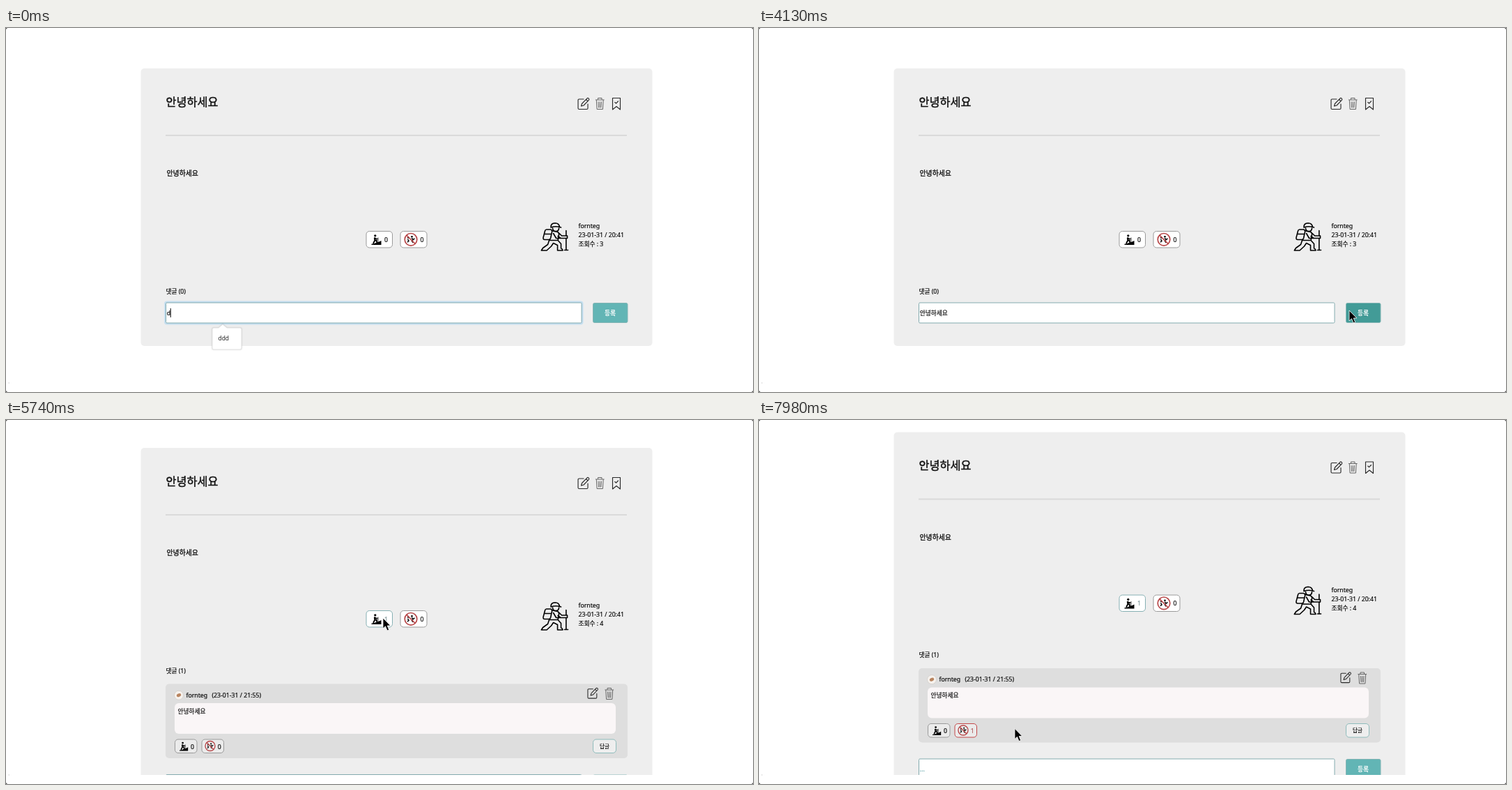
Animation, 1072 px wide and 522 px high, one loop 8000 ms. Source, as an HTML page:

```html
<!DOCTYPE html>
<html lang="ko">
<head>
<meta charset="utf-8">
<title>댓글</title>
<style>
  html, body { margin: 0; width: 100%; height: 100%; overflow: hidden; background: #fff; }
  svg { display: block; width: 1072px; height: 522px; }
  text { font: 500 8.7px "Noto Sans", "Noto Sans CJK KR", sans-serif; fill: #111; stroke: #111; stroke-width: .22; white-space: pre; }
  .title { font-size: 16.3px; stroke-width: .45; }
  .body { font-size: 9.9px; stroke-width: .3; }
  .reply { font-size: 7.6px; }
  .submit { font-weight: 700; fill: #fff; stroke: none; }
  .pop text { font-size: 8.4px; font-weight: 400; fill: #222; stroke: none; }
  .icon { fill: none; stroke: #2a2a2a; stroke-width: 1.15; stroke-linecap: round; stroke-linejoin: round; }
  .btn { fill: #fff; stroke: #9a9a9a; }
  .small { fill: #ebebeb; }
</style>
</head>
<body>
<svg viewBox="0 0 1072 522">
  <defs>
    <clipPath id="view"><rect width="1072" height="509"/></clipPath>
    <g id="edit" class="icon">
      <path d="M9 2.500H2.500Q1 2.500 1 4V15.500Q1 17 2.500 17H13.500Q15 17 15 15.500V9.500"/>
      <path d="M5.500 12.500L6.500 9L14 1.300Q15 .5 16.200 1.600Q17.300 2.800 16.400 3.800L9 11.500ZM12.500 3L14.800 5.200"/>
    </g>
    <g id="trash" class="icon" style="stroke:#666;stroke-width:1">
      <path d="M.8 3.500H12.700M4 3V1H9.500V3M1.800 4L2.600 17H10.900L11.700 4M4.500 6.500L5 14.500M6.750 6.500V14.500M9 6.500L8.500 14.500"/>
    </g>
    <g id="mark" class="icon"><path d="M1 1H12V17.500L6.500 13L1 17.500ZM4.300 7L6 8.700L9 5.500"/></g>
    <g id="climb">
      <path d="M0 15V13.800L5 12.800L8 11L11 10.500L14 9V15Z"/>
      <circle cx="5.300" cy="1.800" r="1.600"/>
      <path d="M4.200 4.500L4.800 8.500L2.500 13M4.800 8.500L7.500 9V11.500M4.500 4.800L6.500 6.600L9 6.300" fill="none" stroke="#000" stroke-width="1.800" stroke-linejoin="round"/>
      <path d="M9.500 4.500V10.500" stroke="#000" stroke-width=".7"/>
    </g>
    <g id="ban">
      <circle cx="1.500" cy="-4" r="1.300"/><circle cx="-4" cy="-2.500" r="1.100"/>
      <path d="M-4.500 -.5L-3 2L-5 4M1 -2L3.500 0L1.500 2L3 4.500M3.500 0L5.500 -1.500" fill="none" stroke="#111" stroke-width="1.600"/>
      <circle r="8.800" fill="none" stroke="#b8484a" stroke-width="1.700"/>
      <path d="M-6.200 -6.200L6.200 6.200" stroke="#b8484a" stroke-width="1.700"/>
    </g>
    <path id="hiker" fill="none" stroke="#000" stroke-width="1.600" stroke-linecap="round" stroke-linejoin="round"
      d="M14.500 7.500Q14 1.500 20.500 1.200Q26 1.300 27 6.500M14.500 7.500Q21 5 29 7.500M17 8.500Q17 13 21.500 13Q26 13 26 8.500
         M8 10.500H14Q16.500 11 16 14L14 23Q13.500 25 11.500 25H5.500Q3 25 3.500 22L6 12.500Q6.500 10.500 8 10.500M4.800 17H15
         M17 12.500L24 14Q26.500 15 26 18L24.500 26H12M26.500 16L30 19.500H38V23H28.500L24.500 20M18 16L22 23H28
         M36.300 12V19M36.300 23V40M34 40H39
         M12 26L10 32L3 37L.8 40.500H8.500L15 34.500L18 30L24 33V40.500H31.500Q31 38 29 37.500V31L24.500 26"/>
  </defs>

  <g clip-path="url(#view)">
    <g id="page">
      <path d="M4 -9H1072" stroke="#555" stroke-width="1.500"/>
      <rect id="card" x="193.500" y="58" width="734" height="398" rx="5" fill="#eee"/>
      <text class="title" x="229.500" y="111.500">안녕하세요</text>
      <use href="#edit" x="820" y="99.500"/>
      <use href="#trash" x="845.500" y="99.500"/>
      <use href="#mark" x="869.500" y="99.500"/>
      <path d="M229 154H891" stroke="#dadada" stroke-width="2"/>
      <text class="body" x="230.500" y="212">안녕하세요</text>

      <rect id="likeBox" class="btn" x="517" y="291.500" width="37.500" height="23.500" rx="4.500"/>
      <use href="#climb" x="524.500" y="296"/>
      <text id="likes" x="543" y="306.700">0</text>
      <rect class="btn" x="566" y="291.500" width="38" height="23.500" rx="4.500"/>
      <use href="#ban" x="581" y="303.300"/>
      <text x="594.500" y="306.700">0</text>

      <use href="#hiker" x="767.500" y="278.500"/>
      <text x="821.500" y="287.300">fornteg</text>
      <text x="821.500" y="300.300">23-01-31 / 20:41</text>
      <text id="views" x="821.500" y="313.300"></text>
      <text id="count" x="229.500" y="380.500"></text>

      <g id="comment">
        <rect x="229" y="396.500" width="663" height="106.500" rx="5" fill="#dedede"/>
        <circle cx="248" cy="412.700" r="6.500" fill="#f6f2ee" stroke="#c9c4c0" stroke-width=".6"/>
        <ellipse cx="248" cy="412.700" rx="3.300" ry="2.300" fill="#b98560" transform="rotate(-25 248 412.700)"/>
        <text x="258.500" y="415.700">fornteg</text>
        <text x="295.500" y="415.700">(23-01-31 / 21:55)</text>
        <use href="#edit" transform="translate(834 401.500) scale(.92)"/>
        <use href="#trash" x="859" y="401.500"/>
        <rect x="242" y="424" width="633" height="44" rx="6" fill="#faf6f7"/>
        <text x="246.500" y="438.800">안녕하세요</text>
        <rect class="btn small" x="242.500" y="476" width="31.500" height="19.500" rx="4.500"/>
        <use href="#climb" transform="translate(249 479.500) scale(.87)"/>
        <text x="265" y="489.700">0</text>
        <rect id="banBox" class="btn small" x="281" y="476" width="31.500" height="19.500" rx="4.500"/>
        <use href="#ban" transform="translate(293 485.500) scale(.8)"/>
        <text id="bans" x="303.700" y="489.700">0</text>
        <rect x="842.500" y="476" width="33" height="19.500" rx="4.500" fill="#eee" stroke="#8fbcbc"/>
        <text class="reply" x="852" y="488.700">답글</text>
      </g>

      <g id="form">
        <rect id="glow" x="229" y="393.500" width="597.500" height="30" rx="2" fill="none" stroke="#c6dff0" stroke-width="4"/>
        <rect x="229.500" y="394" width="596.500" height="29" rx="1.500" fill="#fff" stroke="#82aaae"/>
        <text id="typed" x="230.800" y="411.800"></text>
        <path id="under" stroke="#222" stroke-width=".9"/>
        <path id="caret" stroke="#000" stroke-width="1"/>
        <rect id="submit" x="842.500" y="394.500" width="49.500" height="28" rx="2" stroke="#82b4b4"/>
        <text class="submit" x="859" y="411.800">등록</text>
      </g>
    </g>
    <g id="popup" class="pop"></g>
  </g>

  <path d="M3.500 509H5" stroke="#bbb" stroke-width=".8"/>
  <path d="M0 0H2L0 2ZM1072 0H1070L1072 2ZM0 522H2L0 520ZM1072 522H1070L1072 520Z" fill="#555"/>
  <path id="beam" fill="none" stroke="#111" stroke-width="1.500" d="M-3.500 -8Q0 -8 0 -5.500Q0 -8 3.500 -8M0 -6V6M-3.500 8Q0 8 0 5.500Q0 8 3.500 8M-2 1.500H2"/>
  <path id="arrow" fill="#000" stroke="#fff" stroke-width=".8" d="M0 0V15L3.500 11.800L6 18L8.700 16.900L6.200 11H10.800Z"/>
</svg>
<script>
const LOOP = 8000, STEP = 70, CHAR = 8;
const BLUR = 3990, RELOAD = 4410, LIKED = 5670, BANNED = 7490;
const $ = id => document.getElementById(id);

const popups = {
  d: { w: 42, items: ['ddd'] },
  jamo: { w: 115, items: ['ㅇㅇ', 'ㅇㅇㅇㅇ', 'ㅇㅇㅇㅇㅇㅇㅇㅇㅇㅇㅇㅇ'] },
  hello: { w: 83, items: ['안녕하세요', '안녕하세요ㅎㅎ', '안녕하세요!!!'] }
};

// time, input text, suggestion list
const typing = [
  [0, 'd', 'd'], [770, ''], [980, 'ㅇ'], [1050, 'ㅇ', 'jamo'], [1260, '아'],
  [1400, '안'], [1540, '안ㄴ'], [1680, '안녀'], [2030, '안녕'], [2240, '안녕ㅎ'],
  [2310, '안녕하'], [2380, '안녕하', 'hello'], [2450, '안녕핫'], [2520, '안녕하세'],
  [2590, '안녕하세', 'hello'], [2660, '안녕하셍'], [2800, '안녕하세요', 'hello'],
  [BLUR, '안녕하세요'], [RELOAD, '...']
];

// time, x, y
const pointer = [
  [3290, 532, 398], [3990, 847, 405], [4760, 847, 405], [5250, 559, 329],
  [5530, 541, 284], [5810, 541, 284], [6160, 289, 457], [6370, 289, 457],
  [6790, 384, 361], [7000, 334, 402], [7070, 334, 402], [7280, 291, 438],
  [7350, 291, 438], [7630, 288, 443], [7840, 288, 443], [7980, 367, 442.5]
];

// time, page offset
const scroll = [
  [4409, 0], [RELOAD, 10.5], [5250, 10.5], [5530, -18], [LIKED - 1, -18], [LIKED, 10.5],
  [LIKED + 69, 10.5], [LIKED + 70, -18], [6790, -18], [7000, -40.5]
];

function track(keys, t) {
  const i = keys.findIndex(k => k[0] > t);
  if (i === 0) return keys[0].slice(1);
  if (i < 0) return keys[keys.length - 1].slice(1);
  const a = keys[i - 1], b = keys[i];
  const u = (t - a[0]) / (b[0] - a[0]), e = u * u * (3 - 2 * u);
  return a.slice(1).map((v, n) => v + (b[n + 1] - v) * e);
}

function show(id, on) { $(id).style.display = on ? '' : 'none'; }
function put(id, x, y) { $(id).setAttribute('transform', `translate(${x} ${y})`); }
function paint(id, attr, value) { $(id).style[attr] = value; }
function ink(id, color) { paint(id, 'fill', color); paint(id, 'stroke', color); }

function popupMarkup({ w, items }) {
  const right = 296 + w, bottom = items.length > 1 ? 540 : 461;
  const box = `M298 430H305L311 425L317 430H${right - 2}Q${right} 430 ${right} 432V${bottom - 2}` +
    `Q${right} ${bottom} ${right - 2} ${bottom}H298Q296 ${bottom} 296 ${bottom - 2}V432Q296 430 298 430Z`;
  return `<path d="${box}" fill="none" stroke="#000" stroke-opacity=".05" stroke-width="3"/>` +
    `<path d="${box}" fill="#fff" stroke="#d4d4d4" stroke-width=".7"/>` +
    items.map((s, i) => `<text x="304.500" y="${448.3 + i * 24.6}">${s}</text>`).join('');
}

let openList;
function drawPopup(name) {
  if (name === openList) return;
  openList = name;
  $('popup').innerHTML = name ? popupMarkup(popups[name]) : '';
}

function drawInput(t) {
  const [, text, list] = typing.filter(k => k[0] <= t).pop();
  const end = 231 + (text === 'd' ? 5.2 : text.length * CHAR);
  $('typed').textContent = text;
  ink('typed', t < RELOAD ? '#111' : '#5fa3a8');
  $('caret').setAttribute('d', `M${end} 402V415`);
  show('caret', t < 420 || (t >= 980 && t < 2800));
  $('under').setAttribute('d', `M${end - CHAR + .5} 414.800H${end - .5}`);
  show('under', t >= 980 && t < BLUR);
  show('glow', t < BLUR);
  drawPopup(list);
}

function draw(time) {
  const t = Math.floor(time / STEP) * STEP;
  const fresh = t >= RELOAD, liked = t >= LIKED, banned = t >= BANNED;

  put('page', 0, track(scroll, t)[0]);
  put('form', 0, fresh ? 132.5 : 0);
  $('card').setAttribute('height', fresh ? 560 : 398);
  show('comment', fresh);
  $('views').textContent = '조회수 : ' + (fresh ? 4 : 3);
  $('count').textContent = `댓글 (${fresh ? 1 : 0})`;
  $('likes').textContent = liked ? 1 : 0;
  ink('likes', liked ? '#849b9e' : '#111');
  paint('likeBox', 'stroke', liked ? '#86b0b3' : '#9a9a9a');
  $('bans').textContent = banned ? 1 : 0;
  ink('bans', banned ? '#b05a5c' : '#111');
  paint('banBox', 'stroke', banned ? '#c4484a' : '#9a9a9a');
  drawInput(t);

  const [x, y] = track(pointer, t);
  const inField = x < 827 && t < BLUR;
  put('beam', x, y);
  put('arrow', x, y);
  show('beam', t >= 3290 && inField);
  show('arrow', t >= 3290 && !inField);
  paint('submit', 'fill', x > 842 && t >= 3290 && !fresh ? '#429b97' : '#62b5b5');
}

const start = performance.now();
function tick() {
  draw((performance.now() - start) % LOOP);
  requestAnimationFrame(tick);
}
tick();
</script>
</body>
</html>
```
